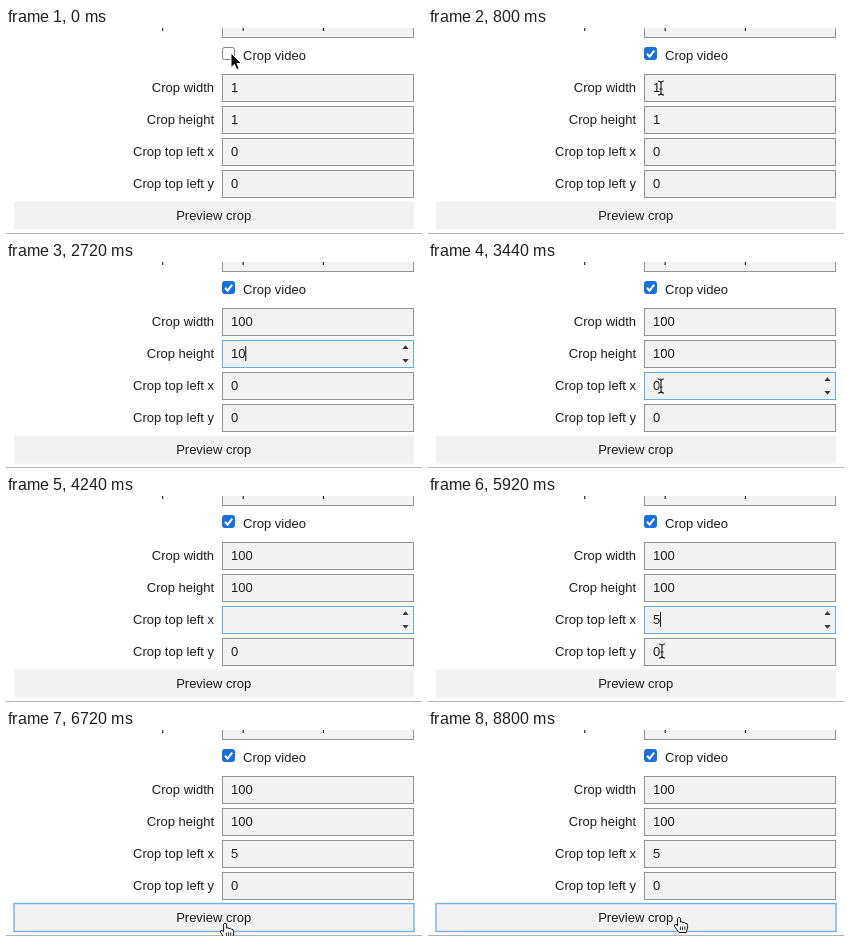
These frames come from a looping animation (416 px wide and 206 px high, 8880 ms). An HTML page:

```html
<!DOCTYPE html>
<html lang="en">
<head>
<meta charset="utf-8">
<title>Crop form</title>
<style>
  html, body { margin: 0; width: 100%; height: 100%; overflow: hidden; background: #fff; }
  svg { display: block; width: 416px; height: 206px; }
  text { font: 13px "Liberation Sans", Arial, sans-serif; fill: #1c1c1c; white-space: pre; }
  .label { text-anchor: end; }
  .box { fill: #f3f3f3; stroke: #929292; }
  .focus .box { stroke: #69abe4; }
  .spin { fill: #3c3c3c; visibility: hidden; }
  .focus .spin { visibility: visible; }
  .caret { fill: #111; }
  #button rect { fill: #f2f2f2; }
  #button.focus rect { stroke: #78aee0; stroke-width: 1.4; }
</style>
</head>
<body>
<svg viewBox="0 0 416 206">
  <defs><clipPath id="inside"><rect x="217" y="-18" width="190" height="27"/></clipPath></defs>
  <text class="label" x="208" y="0">Input video</text>
  <rect class="box" x="216.5" y="-17.5" width="191" height="27"/>
  <text x="225" y="0" clip-path="url(#inside)">Input/videos/setpieces/clean.webm</text>

  <rect id="check" x="216.5" y="19.5" width="12" height="12" rx="2"/>
  <path id="tick" d="M219 25.8l2.6 2.8 4.6-6" fill="none" stroke="#fff" stroke-width="2"/>
  <text x="237" y="32">Crop video</text>

  <g id="fields"></g>

  <g id="button">
    <rect x="8" y="173.5" width="400" height="28"/>
    <text x="207.7" y="192" text-anchor="middle">Preview crop</text>
  </g>
  <path d="M0 205.5H416" stroke="#b4b4b4"/>

  <g id="pointer">
    <path id="arrow" d="M0 0V14.5L3.4 11.4 5.7 16.6 8.2 15.5 5.9 10.4H10.4Z" fill="#000" stroke="#fff"/>
    <g id="beam" fill="none">
      <path d="M-3-7Q0-7 0-5Q0-7 3-7M0-5V5M-3 7Q0 7 0 5Q0 7 3 7M-1.5 1H1.5" stroke="#fff" stroke-width="2.6"/>
      <path d="M-3-7Q0-7 0-5Q0-7 3-7M0-5V5M-3 7Q0 7 0 5Q0 7 3 7M-1.5 1H1.5" stroke="#111" stroke-width="1.1"/>
    </g>
    <g id="hand">
      <path d="M-1.4 1.2Q0-1 1.4 1.2V5.2Q3 4 4 5.6Q5.6 4.7 6.4 6.3Q8.5 5.7 8.6 8.4V11L7 15.5H0L-4.6 9.3Q-5-.1 7-3 7.3L-1.4 8.8Z" display="none"/>
      <path d="M-1.4 1.2Q0-1 1.4 1.2V5.2Q3 4 4 5.6Q5.6 4.7 6.4 6.3Q8.5 5.7 8.6 8.4V11L7 15.5H0L-4.6 9.3Q-4.8 7-3 7.3L-1.4 8.8Z" fill="#fff" stroke="#111" stroke-linejoin="round"/>
      <path d="M1.4 9.5V13M3.6 9.5V13M5.8 9.5V13" stroke="#111" stroke-width=".9"/>
    </g>
  </g>
</svg>
<script>
const LOOP = 8880, STEP = 80, BLINK = 500, DIGIT = 13 * .556;
const CHECKED_AT = 240, PRESSED_AT = 6560;
const $ = id => document.getElementById(id);

// focus: when the field is clicked; keys: [time, new value]
const rows = [
  { label: "Crop width", start: "1", focus: 880, keys: [[1360, "10"], [1600, "100"]] },
  { label: "Crop height", start: "1", focus: 2320, keys: [[2640, "10"], [2880, "100"]] },
  { label: "Crop top left x", start: "0", focus: 3440, keys: [[3680, ""], [4560, "5"]] },
  { label: "Crop top left y", start: "0", focus: Infinity, keys: [] }
];

$("fields").innerHTML = rows.map((row, i) => `
  <g transform="translate(0 ${46 + 32 * i})">
    <text class="label" x="208" y="18">${row.label}</text>
    <rect class="box" x="216.5" y=".5" width="191" height="27"/>
    <text class="value" x="225" y="18"></text>
    <path class="spin" d="M396.3 9L399.5 5.2 402.7 9ZM396.3 19L399.5 22.8 402.7 19Z"/>
    <rect class="caret" y="6" width="1" height="15"/>
  </g>`).join("");
rows.forEach((row, i) => {
  row.node = $("fields").children[i];
  row.value = row.node.querySelector(".value");
  row.caret = row.node.querySelector(".caret");
});

// pointer stops: [time, x, y]
const path = [
  [0, 225, 25], [320, 225, 25], [800, 233, 60], [1920, 233, 60], [2240, 233, 92],
  [3040, 233, 92], [3360, 233, 124], [5600, 233, 124], [5920, 234, 155],
  [6080, 234, 155], [6400, 219, 193], [7200, 219, 193], [8000, 251, 187], [LOOP, 251, 187]
];
// the pointer disappears while typing
const hidden = [[1360, 1920], [2640, 3040], [3680, 5600]];

function pointerAt(t) {
  const i = path.findIndex(stop => stop[0] > t);
  const [t0, x0, y0] = path[i - 1], [t1, x1, y1] = path[i];
  const p = (t - t0) / (t1 - t0), e = p * p * (3 - 2 * p);
  return [x0 + (x1 - x0) * e, y0 + (y1 - y0) * e];
}

function show(node, on) { node.style.display = on ? "" : "none"; }

function drawRow(row, i, t) {
  const end = rows[i + 1] ? Math.min(rows[i + 1].focus, PRESSED_AT) : PRESSED_AT;
  const focused = t >= row.focus && t < end;
  let text = row.start, since = row.focus;
  for (const [time, value] of row.keys) if (t >= time) [since, text] = [time, value];
  row.node.classList.toggle("focus", focused);
  row.value.textContent = text;
  row.caret.setAttribute("x", 225 + text.length * DIGIT - .2);
  show(row.caret, focused && (t - since) % (2 * BLINK) < BLINK);
}

function drawPointer(t) {
  const [x, y] = pointerAt(t);
  const onButton = y > 173;
  const onField = !onButton && y >= 46 && (y - 46) % 32 < 28;
  $("pointer").setAttribute("transform", `translate(${x} ${y})`);
  show($("pointer"), !hidden.some(([from, to]) => t >= from && t < to));
  show($("hand"), onButton);
  show($("beam"), onField);
  show($("arrow"), !onButton && !onField);
}

function draw(now) {
  const t = Math.floor(now % LOOP / STEP) * STEP;
  const checked = t >= CHECKED_AT;
  $("check").setAttribute("fill", checked ? "#1670df" : "#fff");
  $("check").setAttribute("stroke", checked ? "#1670df" : "#858585");
  show($("tick"), checked);
  rows.forEach((row, i) => drawRow(row, i, t));
  $("button").classList.toggle("focus", t >= PRESSED_AT);
  drawPointer(t);
}

const begin = performance.now();
function tick() {
  draw(performance.now() - begin);
  requestAnimationFrame(tick);
}
tick();
</script>
</body>
</html>
```
